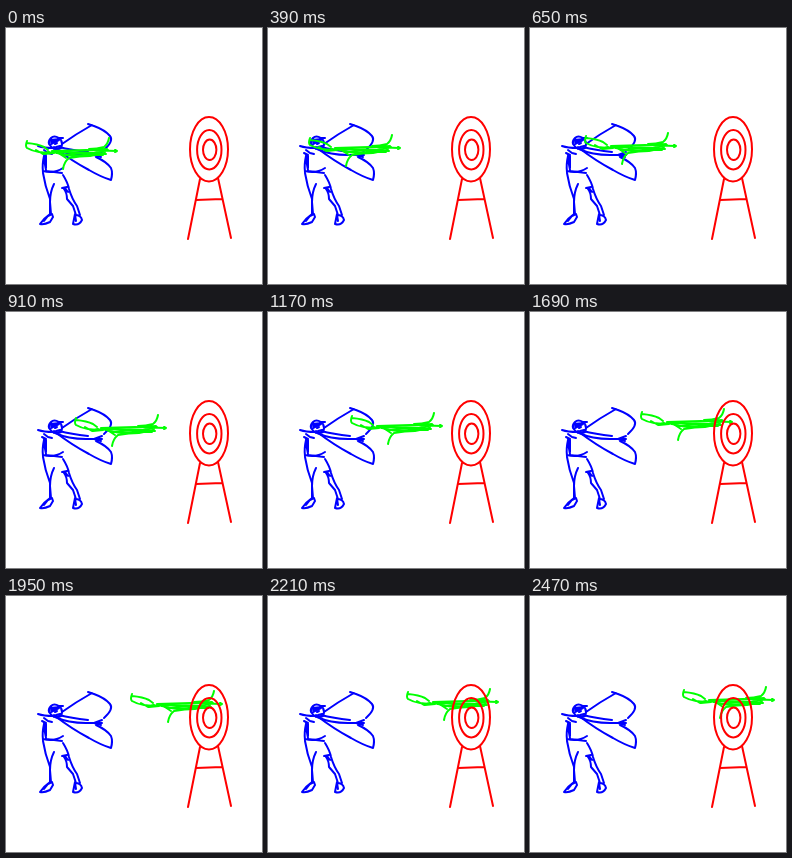
An HTML page without scripts that plays this animation: 256 by 256 pixels, repeating every 2600 ms.

```html
<!DOCTYPE html>
<html lang="en">
<head>
<meta charset="utf-8">
<title>Archer</title>
<style>
  html, body { margin: 0; width: 100%; height: 100%; overflow: hidden; background: #fff; }
  svg { display: block; width: 100%; height: 100%; }
  g { fill: none; stroke-width: 2; stroke-linecap: round; stroke-linejoin: round; }
  .archer { stroke: #00f; }
  .target { stroke: #f00; }
  .arrow { stroke: #0f0; animation: fly 2.6s steps(20, end) infinite; }
  @keyframes fly { to { transform: translate(140px, -20px); } }
</style>
</head>
<body>
<svg viewBox="0 0 256 256">
  <g class="archer">
    <!-- head -->
    <path d="M57 110L53 110Q48 107 45 110Q42 113 43 116Q45 119 48 121M44 112L54 111L45 114L53 112L45 116L48 114"/>
    <path d="M55 112Q57 116 55 120Q51 122 48 119M49 116L51 115M50 119L54 118"/>
    <!-- arms -->
    <path d="M32 118Q38 120 47 120M53 119Q65 122 82 124M49 121Q62 127 80 127L96 127M96 124L88 127L95 129"/>
    <!-- bow -->
    <path d="M56 116Q70 106 86 97M82 96L88 98Q99 102 104 108Q108 113 98 122"/>
    <path d="M49 120Q66 133 83 142Q95 149 105 152Q107 145 105 140Q101 134 90 129"/>
    <!-- torso -->
    <path d="M38 122L42 125L46 126M36 125L40 127M38 126Q38 134 40 142M40 128L40 140M38 128Q36 137 37 144M37 143Q48 146 57 140M40 143L56 145"/>
    <!-- legs -->
    <path d="M37 145Q39 158 44 171L44 187M48 156Q44 164 44 174L45 186M44 186Q38 190 34 196Q38 197 44 194L47 189L46 186L42 188L38 193"/>
    <path d="M57 147Q62 155 63 161Q66 171 71 178L74 187M56 160L61 159L58 161Q61 165 61 171L67 178L70 187M59 160L62 164M69 186L67 196Q73 198 76 192Q75 187 69 187L70 193"/>
  </g>
  <g class="arrow">
    <!-- fletching -->
    <path d="M21 113Q19 118 21 120Q26 123 33 124L42 125M21 115Q32 116 38 119L42 122M30 122L37 126L43 124L38 126L48 125"/>
    <!-- shaft and tip -->
    <path d="M46 123L80 122L111 123M109 122L111 123L109 124M38 125L48 124L58 127L78 125L100 126M50 125L62 124L88 125L102 122"/>
    <!-- limbs -->
    <path d="M103 110Q102 116 98 119Q91 121 83 121M96 120L86 122L101 121"/>
    <path d="M57 141Q58 134 63 130Q74 128 84 128L98 125M60 130L54 126L66 128L78 127L97 127L99 124"/>
  </g>
  <g class="target">
    <ellipse cx="203" cy="121.2" rx="19" ry="32.2"/>
    <ellipse cx="203.3" cy="121.7" rx="12.2" ry="19.7"/>
    <ellipse cx="203.7" cy="121.8" rx="6.7" ry="10.2"/>
    <path d="M194 151L182 211M212 150L225 210M190 172L216 171"/>
  </g>
</svg>
</body>
</html>
```
